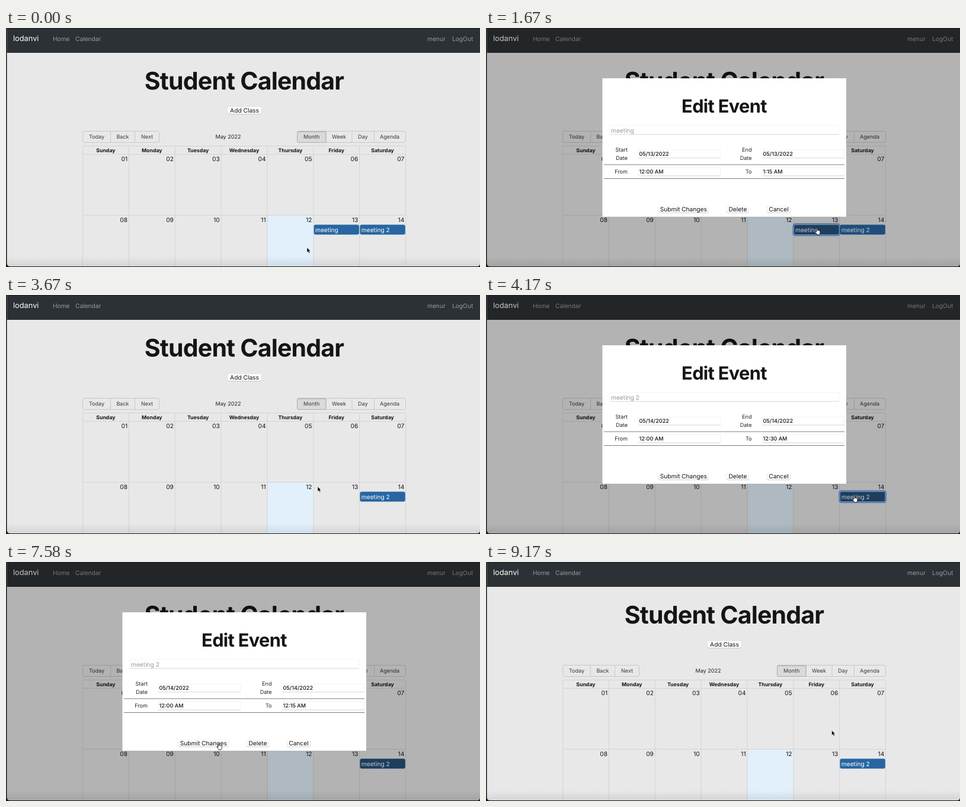
Animation of 800x404 px, one loop 9.26 s. Source, as an HTML page:

```html
<!DOCTYPE html>
<html lang="en">
<head>
<meta charset="utf-8">
<title>Student Calendar</title>
<style>
  html, body { margin: 0; width: 100%; height: 100%; overflow: hidden; background: #14181d; }
  svg { display: block; width: 800px; height: 404px; }
  text { font-family: Inter, "Noto Sans", sans-serif; font-optical-sizing: none; text-rendering: geometricPrecision; white-space: pre; }
</style>
</head>
<body>
<svg id="stage" viewBox="0 0 800 404" xmlns="http://www.w3.org/2000/svg">
  <defs>
    <clipPath id="window"><path d="M1.5 0H800V398Q800 403 795 403H7Q1.5 403 1.5 397Z"/></clipPath>
    <clipPath id="list"><rect x="466" y="279.5" width="49" height="116"/></clipPath>
    <linearGradient id="foot" x1="0" y1="0" x2="0" y2="1">
      <stop offset="0" stop-opacity="0"/><stop offset="1" stop-opacity=".09"/>
    </linearGradient>
  </defs>
  <rect width="800" height="404" fill="#14181d"/>
  <g clip-path="url(#window)">
    <g id="page"></g>
    <g id="modal"></g>
    <rect y="386" width="800" height="18" fill="url(#foot)"/>
    <rect width="800" height="1" fill="#14181d" opacity=".75"/>
  </g>
  <g id="menu"></g>
  <g id="cursor">
    <path id="arrow" d="M0 0V8.6L2 6.8L3.4 9.9L4.9 9.2L3.5 6.2H6Z" fill="#000" stroke="#fff" stroke-width=".6"/>
    <path id="hand" d="M-.9 .4Q0 -.6 .8 .4V3.3Q1.7 2.6 2.4 3.5Q3.3 2.9 3.9 3.8Q5 3.4 5.2 4.7V7Q5.1 8.5 4.3 9.2V10.3H-.3V9.3L-3 6.2Q-3.3 5 -2.1 5L-.9 6Z" fill="#fff" stroke="#111" stroke-width=".8"/>
    <path id="beam" d="M-2 -5Q-.3 -5 0 -4Q.3 -5 2 -5M0 -4V4M-2 5Q-.3 5 0 4Q.3 5 2 5M-1.2 1.2H1.2" fill="none" stroke="#111" stroke-width=".9"/>
  </g>
</svg>
<script>
const $ = id => document.getElementById(id);

function add(parent, tag, attrs, label) {
  const el = document.createElementNS("http://www.w3.org/2000/svg", tag);
  for (const key in attrs) el.setAttribute(key, attrs[key]);
  if (label !== undefined) el.textContent = label;
  parent.appendChild(el);
  return el;
}
const group = (parent, attrs = {}) => add(parent, "g", attrs);
const box = (parent, x, y, width, height, fill, more = {}) =>
  add(parent, "rect", { x, y, width, height, fill, ...more });
const line = (parent, d, stroke, width = 1) =>
  add(parent, "path", { d, stroke, "stroke-width": width, fill: "none" });
const write = (parent, label, x, y, size, fill, anchor = "start", weight = 400, more = {}) =>
  add(parent, "text", { x, y, fill, "font-size": size, "text-anchor": anchor, "font-weight": weight, ...more }, label);

const INK = "#141517", TIGHT = { "letter-spacing": "-.02em" };

function button(parent, label, x, y, width) {
  box(parent, x, y + .6, width, 11.6, "#bbb", { rx: 2.5 });
  box(parent, x + .2, y, width - .4, 11.4, "#fff", { rx: 2.5, stroke: "#e2e2e2", "stroke-width": .4 });
  write(parent, label, x + width / 2, y + 9, 10.2, "#111", "middle");
}

// Page
const page = $("page");
box(page, 0, 0, 800, 404, "#e8e8e8");
box(page, 0, 0, 800, 42, "#2c3135");
write(page, "lodanvi", 12, 22.3, 12.8, "#fff");
[["Home", 79], ["Calendar", 117], ["menur", 711], ["LogOut", 753]]
  .forEach(([label, x]) => write(page, label, x, 21.8, 10.2, "#989b9d"));
write(page, "Student Calendar", 402, 104, 41, INK, "middle", 700, TIGHT);
button(page, "Add Class", 374, 133.5, 57);

function toolbar(left, right, dividers, labels) {
  box(page, left, 174.5, right - left, 19, "none", { rx: 2.5, stroke: "#c8c8c8" });
  dividers.forEach(x => line(page, `M${x} 174.5V193.5`, "#c8c8c8"));
  labels.forEach(([label, x]) => write(page, label, x, 187.4, 9.05, "#35383b", "middle"));
}
box(page, 491.5, 174.5, 48.5, 19, "#dadada", { rx: 2.5 });
toolbar(129.5, 258.5, [176.5, 217.5], [["Today", 153], ["Back", 197], ["Next", 238]]);
toolbar(491.5, 674.5, [540, 584, 621.5], [["Month", 515.7], ["Week", 562], ["Day", 602.3], ["Agenda", 647.6]]);
box(page, 491.5, 174.5, 48.5, 19, "none", { rx: 2.5, stroke: "#adadad" });
line(page, "M492.5 175.7H539", "#c4c4c4", 1.4);
write(page, "May 2022", 375, 187.4, 9.05, "#222", "middle");

const GRID = "#d4d4d4", COL = 77.86;
box(page, 441.5, 317, 77.5, 87, "#e2f0fb");
line(page, "M129.5 404V199.5H674.5V404M129.5 213.5H674.5M129.5 316.5H674.5", GRID);
["Sunday", "Monday", "Tuesday", "Wednesday", "Thursday", "Friday", "Saturday"].forEach((day, i) => {
  const left = 129.5 + i * COL, right = left + COL;
  if (i) line(page, `M${left} 199.5V404`, GRID);
  write(page, day, left + COL / 2, 210, 8.75, INK, "middle", 700);
  write(page, String(i + 1).padStart(2, "0"), right - 2.3, 225.2, 10.2, INK, "end");
  write(page, String(i + 8).padStart(2, "0"), right - 2.3, 328.3, 10.2, INK, "end");
});

function event(label, x) {
  const g = group(page);
  const bar = box(g, x, 332.5, 76.4, 16.8, "#2766a3", { rx: 3 });
  const ring = group(g);
  box(ring, x - 1, 331.3, 78.4, 19.2, "none", { rx: 3.5, stroke: "#4f92ea", "stroke-width": 2 });
  box(ring, x - .1, 332.3, 76.6, 17.2, "none", { rx: 3, stroke: "#d3e2f2", "stroke-width": .6 });
  write(g, label, x + 2.4, 344.5, 10.2, "#fff");
  return { g, bar, ring };
}
const first = event("meeting", 519.6), second = event("meeting 2", 597.4);

// Dialog
const modal = $("modal");
box(modal, 0, 0, 800, 404, "#000", { opacity: .23 });
box(modal, 196.5, 85, 411.5, 234, "#fff");
write(modal, "Edit Event", 402, 142.8, 30.7, INK, "middle", 700, TIGHT);

function field(x, y, width, height) {
  box(modal, x, y, width, height, "#fff", { stroke: "#ededed", "stroke-width": .7 });
  line(modal, `M${x} ${y + height}H${x + width}`, "#d2d2d2", .8);
}
field(209.5, 164.8, 386, 15.2);
const title = write(modal, "", 211, 176.6, 10.2, "#9a9a9a");
const value = (x, y) => {
  field(x, y - 10, 138.5, 13.6);
  return write(modal, "", x + 1.2, y, 9.1, "#111", "start", 500);
};
const start = value(257.2, 216.2), end = value(466.3, 216.2);
const from = value(257.2, 246.3), to = value(466.3, 246.3);
[["Start", 239, 209.4], ["Date", 239, 222.8], ["End", 448.5, 209.4], ["Date", 448.5, 222.8], ["From", 239, 246.3], ["To", 448.5, 246.3]]
  .forEach(([label, x, y]) => write(modal, label, x, y, 9.1, "#222", "end"));
line(modal, "M199 231H605M199 254.5H605", "#6f6f6f", .9);
button(modal, "Submit Changes", 290.8, 300.6, 85);
button(modal, "Delete", 405.8, 300.6, 38.2);
button(modal, "Cancel", 474, 300.6, 39.8);
const focus = box(modal, 465.7, 235.7, 140, 15, "none", { rx: 1, stroke: "#4a86e4", "stroke-width": 1.7 });

// Time list
const menu = $("menu");
add(menu, "path", { d: "M506 255.5L511.5 251.5L517 255.5", fill: "#f0f0f0", stroke: "#bbb", "stroke-width": .5 });
box(menu, 466.5, 255.3, 48, 140.5, "#fff", { rx: 2.5, stroke: "#aeaeae", "stroke-width": .8 });
box(menu, 466.9, 255.7, 47.2, 23.3, "#f0f0f0", { rx: 2 });
line(menu, "M466.9 279H514", "#b4b4b4", .7);
write(menu, "Time", 490.3, 270.7, 9.1, "#111", "middle", 700);
const list = group(menu, { "clip-path": "url(#list)" });
["12:00 AM", "12:15 AM", "12:30 AM", "12:45 AM", "1:00 AM"].forEach((label, i) => {
  const y = 278.2 + i * 28.9, chosen = i === 2;
  if (chosen) box(list, 466.9, y - 10.2, 47.2, 22.5, "#1e5f9f");
  write(list, label, 490.4, y + 2.7, chosen ? 7.2 : 7.5, chosen ? "#fff" : "#111", "middle", chosen ? 700 : 500);
});
box(menu, 508.8, 280.8, 4.2, 13, "#777", { rx: 2.1 });

// Pointer stops: time, x, y, shape shown from that time on
const LOOP = 9260, STEP = 83.25;
const path = [
  [0, 508, 371, "arrow"], [80, 508, 371, "arrow"], [250, 440, 220, "arrow"], [420, 356, 102, "arrow"],
  [580, 410, 140, "arrow"], [760, 560, 280, "arrow"], [920, 662, 338, "hand"], [1080, 655, 340, "hand"],
  [1330, 558.7, 339, "hand"], [2160, 558.7, 339, "arrow"], [2740, 426.6, 306.8, "hand"],
  [3420, 426.6, 306.8, "arrow"], [3900, 621.7, 340, "hand"], [4580, 621.7, 340, "arrow"],
  [4750, 357, 257, "arrow"], [4920, 345, 235, "arrow"], [5160, 316, 177, "beam"],
  [5330, 320, 190, "arrow"], [5660, 322, 241, "beam"], [5800, 322, 241, "beam"], [6050, 492, 243, "beam"],
  [6320, 492, 243, "arrow"], [6580, 490, 303, "hand"], [6800, 490, 303, "arrow"],
  [7240, 359, 307, "hand"], [7660, 359, 307, "arrow"], [7830, 359, 307, "arrow"],
  [8500, 583.5, 284.5, "arrow"], [LOOP, 583.5, 284.5, "arrow"]
];
const shapes = ["arrow", "hand", "beam"].map($);
const show = (el, on) => el.setAttribute("visibility", on ? "inherit" : "hidden");
const within = (t, a, b) => t >= a && t < b;

function draw(now) {
  const t = Math.min(110, Math.floor((now % LOOP) / STEP)) * STEP;

  const i = path.findIndex(p => p[0] > t) - 1;
  const [t0, x0, y0, kind] = path[i], [t1, x1, y1] = path[i + 1];
  const u = (t - t0) / (t1 - t0), k = u * u * (3 - 2 * u);
  $("cursor").setAttribute("transform", `translate(${x0 + (x1 - x0) * k} ${y0 + (y1 - y0) * k})`);
  shapes.forEach(s => show(s, s.id === kind));

  const editFirst = within(t, 1410, 3320), editSecond = within(t, 4070, 7650);
  show(modal, editFirst || editSecond);
  show(first.g, t < 3320);
  show(first.ring, within(t, 1410, 2900));
  show(second.ring, within(t, 4070, 6060));
  first.bar.setAttribute("fill", editFirst ? "#265079" : "#2766a3");
  second.bar.setAttribute("fill", editSecond ? "#265079" : "#2766a3");

  title.textContent = t < 4000 ? "meeting" : "meeting 2";
  start.textContent = end.textContent = t < 4000 ? "05/13/2022" : "05/14/2022";
  from.textContent = "12:00 AM";
  to.textContent = t < 4000 ? "1:15 AM" : t < 6730 ? "12:30 AM" : "12:15 AM";
  show(focus, within(t, 6060, 7480));
  show(menu, within(t, 6060, 6730));
}

function tick() {
  draw(performance.now());
  requestAnimationFrame(tick);
}
tick();
</script>
</body>
</html>
```
